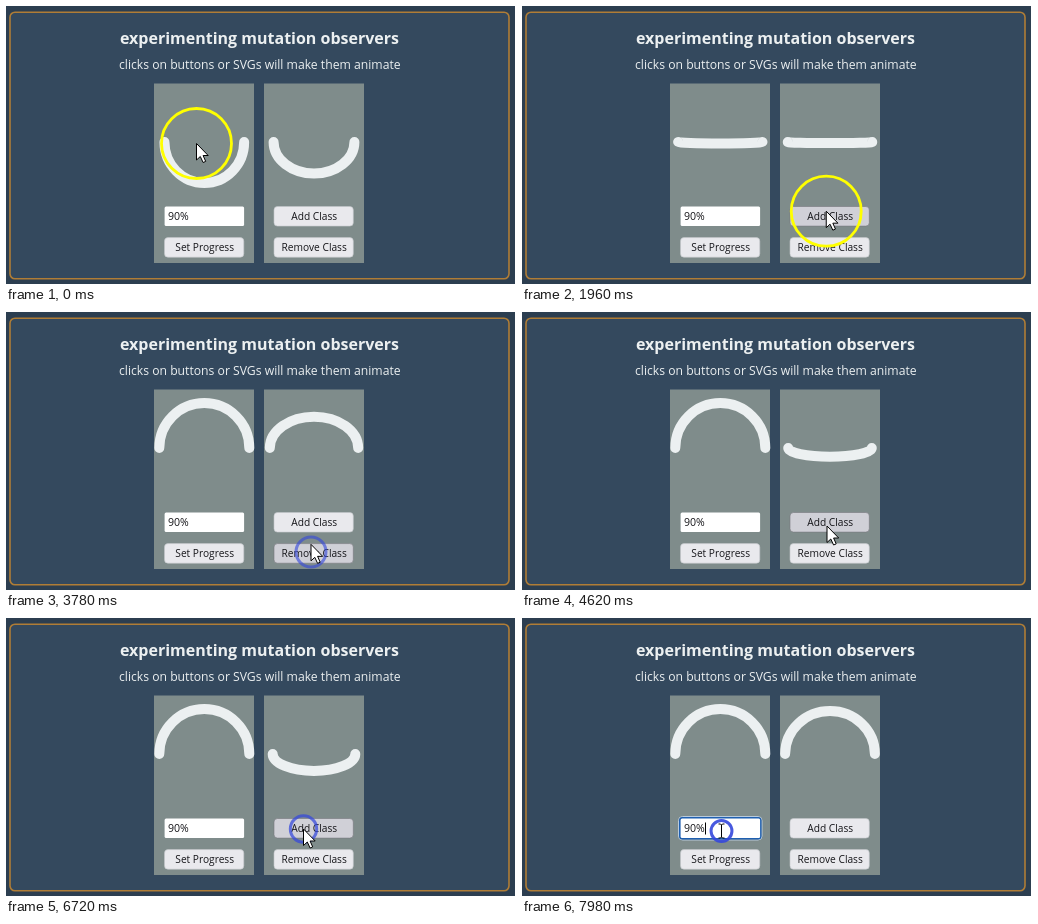
These frames come from a looping animation (510x278 px, 8000 ms). An HTML page:

```html
<!DOCTYPE html>
<html lang="en">
<head>
<meta charset="utf-8">
<title>Mutation observers</title>
<style>
  html, body { margin: 0; width: 100%; height: 100%; overflow: hidden; background: #2c3e50; }
  svg { display: block; width: 510px; height: 278px; }
  text { font: 10.2px "Open Sans", "Noto Sans", sans-serif; fill: #16161a; }
  .mid { text-anchor: middle; }
  .head { font-size: 16px; font-weight: 700; fill: #ecf0f1; }
  .sub { font-size: 12.2px; fill: #ecf0f1; }
  .panel { fill: #7f8c8b; }
  .arc { fill: none; stroke: #ecf0f1; stroke-width: 10; stroke-linecap: round; }
  .btn { fill: #e9e9ed; stroke: #c3c6c9; stroke-width: .6; }
  .btn.hover { fill: #d0d0d7; stroke: #77777f; }
</style>
</head>
<body>
<svg viewBox="0 0 510 278">
  <rect x="4" y="6.2" width="499" height="266.6" rx="5" fill="#34495e" stroke="#b07d36" stroke-width="1.600"/>
  <rect x="509" width="1" height="278" fill="#fff"/>
  <text class="mid head" x="253.5" y="38.4">experimenting mutation observers</text>
  <text class="mid sub" x="253.8" y="63.4">clicks on buttons or SVGs will make them animate</text>
  <rect class="panel" x="148" y="77.5" width="100" height="179.5"/>
  <rect class="panel" x="258" y="77.5" width="100" height="179.5"/>
  <path class="arc" id="left"/>
  <path class="arc" id="right"/>
  <g id="focus" fill="none">
    <rect x="156.5" y="198.5" width="83.5" height="23.5" rx="4" stroke="#b9cbdc"/>
    <rect x="158" y="200" width="80.5" height="20.5" rx="2.5" stroke="#1f5fb0" stroke-width="2"/>
  </g>
  <rect x="158.6" y="200.5" width="79.5" height="19.6" rx="1.5" fill="#fff"/>
  <text x="162" y="214" style="font-size:10.6px">90%</text>
  <path id="caret" d="M183.5 204.500V216.500" stroke="#000"/>
  <g id="buttons"></g>
  <circle id="ripple" fill="none" stroke="#3548dc" stroke-width="3"/>
  <circle id="halo" r="35" fill="none" stroke="#ff0" stroke-width="2.800"/>
  <path id="arrow" d="M0 0V16.500L3.800 13L6.600 19L9.200 17.900L6.600 12H11.700Z" fill="#fff" stroke="#000"/>
  <path id="beam" d="M-3 -7H-1L0 -6L1 -7H3M0 -6V6M-3 7H-1L0 6L1 7H3" fill="none" stroke="#000"/>
</svg>
<script>
const LOOP = 8000, REST = 210, RIPPLE = 760, HALO_END = 3200;
const SMILE = 41, FROWN = -45;
const $ = id => document.getElementById(id);

// Each click may turn an arc towards a smile (1) or a frown (-1)
const clicks = [
  { at: 465, x: 190.5, y: 137.5, left: -1 },
  { at: 1120, x: 285.5, y: 146, right: -1 },
  { at: 2500, x: 304.5, y: 206, right: -1 },
  { at: 3490, x: 305, y: 240, right: 1 },
  { at: 4880, x: 305, y: 214, right: -1 },
  { at: 5640, x: 302, y: 241, right: 1 },
  { at: 6517, x: 297.5, y: 211, right: -1 },
  { at: 7910, x: 199.5, y: 213 }
];

const buttons = [["Set Progress", 158.5, 231.6], ["Add Class", 268, 200.5], ["Remove Class", 268, 231.6]]
  .map(([label, x, y]) => {
    $("buttons").insertAdjacentHTML("beforeend",
      `<rect class="btn" x="${x}" y="${y}" width="79.3" height="19.6" rx="3.5"/>` +
      `<text class="mid" x="${x + 40.2}" y="${y + 13.6}">${label}</text>`);
    return { x, y, box: $("buttons").lastElementChild.previousElementSibling };
  });

const clamp = (v, lo, hi) => Math.max(lo, Math.min(hi, v));

// The arc bends at constant speed in the direction of the latest click
function depthAt(t, side, depth, dir, speed) {
  let last = 0;
  const advance = to => {
    depth = clamp(depth + dir * speed * (to - last), FROWN, SMILE);
    last = to;
  };
  for (const c of clicks) {
    if (c.at > t || !c[side]) continue;
    advance(c.at);
    dir = c[side];
  }
  advance(t);
  return depth;
}

function drawArc(id, cx, depth) {
  const rx = 42.3 - depth * 0.06;
  $(id).setAttribute("d",
    `M${cx - rx} 136A${rx} ${Math.abs(depth)} 0 0 ${depth < 0 ? 1 : 0} ${cx + rx} 136`);
}

// Rest around each click, ease out towards the next
function mouseAt(t) {
  const next = clicks.find(c => c.at + REST > t) || clicks[clicks.length - 1];
  const prev = clicks[clicks.indexOf(next) - 1] || next;
  const from = prev.at + REST, to = next.at - REST;
  const k = prev === next ? 1 : 1 - (1 - clamp((t - from) / (to - from), 0, 1)) ** 4;
  return [prev.x + (next.x - prev.x) * k, prev.y + (next.y - prev.y) * k];
}

const show = (el, on) => el.setAttribute("visibility", on ? "visible" : "hidden");
const inside = (px, py, x, y) => px >= x && px <= x + 79 && py >= y && py <= y + 20;

function draw(t) {
  drawArc("left", 198.3, depthAt(t, "left", SMILE, 0, 0.0264));
  drawArc("right", 308, depthAt(t, "right", 31.5, 1, 0.0475));

  const [x, y] = mouseAt(t);
  const overInput = inside(x, y, 159, 201);
  for (const id of ["halo", "arrow", "beam"]) $(id).setAttribute("transform", `translate(${x} ${y})`);
  show($("halo"), t < HALO_END);
  show($("arrow"), !overInput);
  show($("beam"), overInput);
  for (const b of buttons) b.box.classList.toggle("hover", inside(x, y, b.x, b.y));

  const click = clicks.find(c => c.at > HALO_END && t >= c.at && t < c.at + RIPPLE);
  show($("ripple"), click);
  if (click) {
    const age = t - click.at, ring = $("ripple");
    ring.setAttribute("cx", click.x);
    ring.setAttribute("cy", click.y);
    ring.setAttribute("r", 9 + age * 0.0205);
    ring.setAttribute("opacity", 1 - age / RIPPLE);
  }
  const focused = t >= clicks[clicks.length - 1].at;
  show($("focus"), focused);
  show($("caret"), focused);
}

const start = performance.now();
function tick() {
  draw((performance.now() - start) % LOOP);
  requestAnimationFrame(tick);
}
tick();
</script>
</body>
</html>
```
